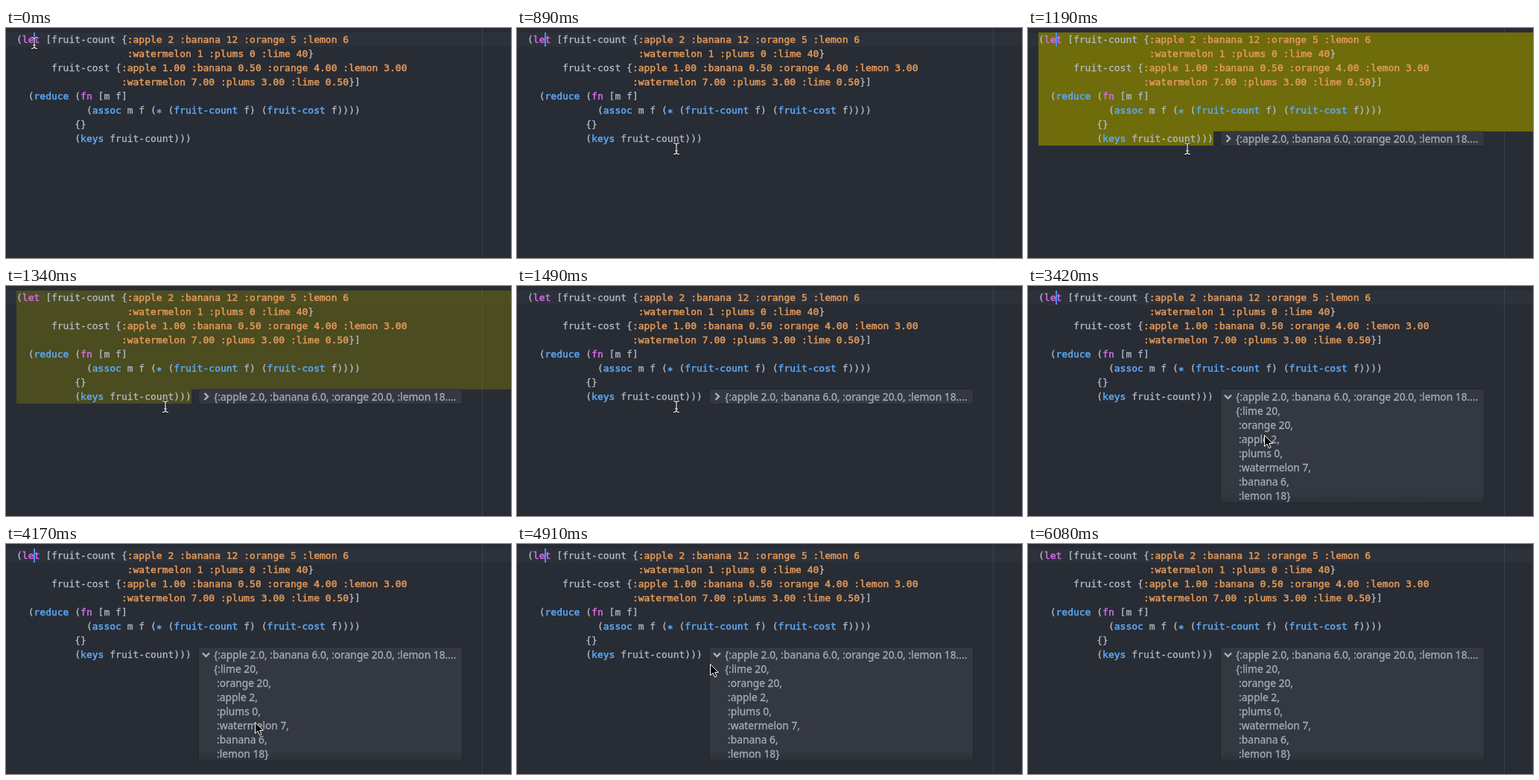
Recreate the animation shown at these times as an HTML page. Size 678 px wide and 309 px high, loop 6380 ms.

```html
<!DOCTYPE html>
<html lang="en">
<meta charset="utf-8">
<title>Inline evaluation</title>
<style>
  html, body { margin: 0; width: 100%; height: 100%; overflow: hidden; background: #282c34; }
  body > * { position: absolute; }
  pre { margin: 0; color: #b4bbc8; font: 13px/19px "DejaVu Sans Mono", monospace; }
  #code { left: 14px; top: 6px; -webkit-text-stroke: .3px; }
  #code span { -webkit-text-stroke: .5px; }
  .special { color: #d56cea; }
  .call { color: #5caaf8; }
  .star { position: relative; top: 3px; }
  .value { color: #e2995a; }
  #line { left: 0; top: 6px; width: 678px; height: 19px; background: #2c313a; }
  #guide { left: 639px; top: 0; width: 1px; height: 309px; background: #3b404a; }
  #flash { left: 14px; top: 6px; width: 664px; height: 152px; background: #6e6c0b;
    clip-path: polygon(0 0, 100% 0, 100% 133px, 235px 133px, 235px 100%, 0 100%); }
  #caret { left: 37px; top: 6px; width: 2px; height: 19px; background: #528bff; }
  #result { left: 259px; top: 139px; width: 353px; height: 19px; overflow: hidden;
    border-radius: 3px; background: #343841; box-shadow: 0 0 2px #1c1f25; }
  #result.open { height: 152px; background: linear-gradient(#343841 139px, #2c3038); }
  #result pre { margin-left: 20px; color: #a5acba; font: 13.8px/19px "Noto Sans", sans-serif;
    -webkit-text-stroke: .3px; }
  #result div { padding-left: 4px; }
  #result svg { position: absolute; left: 4px; top: 4px; }
  .open svg { transform: rotate(90deg); }
  #mouse { left: 0; top: 0; overflow: visible; }
</style>
<body>
<div id="line"></div>
<div id="guide"></div>
<div id="flash"></div>
<pre id="code">
(let [fruit-count {:apple 2 :banana 12 :orange 5 :lemon 6
                   :watermelon 1 :plums 0 :lime 40}
      fruit-cost {:apple 1.00 :banana 0.50 :orange 4.00 :lemon 3.00
                  :watermelon 7.00 :plums 3.00 :lime 0.50}]
  (reduce (fn [m f]
            (assoc m f (* (fruit-count f) (fruit-cost f))))
          {}
          (keys fruit-count)))</pre>
<div id="result">
  <svg width="11" height="11"><path d="M3.5 1L8 5.5L3.5 10" fill="none" stroke="#abb2bf" stroke-width="2.4"/></svg>
  <pre>{:apple 2.0, :banana 6.0, :orange 20.0, :lemon 18....
{:lime 20,<div>:orange 20,
:apple 2,
:plums 0,
:watermelon 7,
:banana 6,
:lemon 18}</div></pre>
</div>
<div id="caret"></div>
<svg id="mouse" width="1" height="1">
  <defs><path id="stem" d="M-4-7.5Q0-7.5 0-5V5Q0 7.5-4 7.5M4-7.5Q0-7.5 0-5M0 5Q0 7.5 4 7.5M-2 3H2"/></defs>
  <g id="beam" fill="none">
    <use href="#stem" stroke="#15171b" stroke-width="2.6"/>
    <use href="#stem" stroke="#f4f4f4" stroke-width="1.2"/>
  </g>
  <path id="arrow" d="M.5-.5V14.5L4.1 11.3L6.5 16.8L9 15.7L6.6 10.4H11.3Z" fill="#000" stroke="#fff"/>
</svg>
<script>
  const LOOP = 6380;
  const $ = id => document.getElementById(id);

  // The caret switches at each of these times, starting visible.
  const blinks = [440, 890, 1340, 1640, 2080, 2530, 2820, 3270, 3720, 4170, 4460, 4910, 5350, 5650, 6080];

  // time, x, y, pointer shape
  const moves = [
    [0, 38, 20, 'beam'], [150, 104, 76, 'beam'], [300, 186, 142, 'beam'], [440, 214, 162, 'beam'],
    [2230, 222, 160, 'beam'], [2380, 250, 153, 'beam'], [2530, 266, 148, 'arrow'],
    [2970, 270, 152, 'arrow'], [3120, 284, 168, 'arrow'], [3270, 304, 188, 'arrow'],
    [3420, 317, 201, 'arrow'], [3570, 330, 232, 'arrow'], [3720, 338, 248, 'arrow'],
    [4170, 334, 240, 'arrow'], [4320, 312, 214, 'arrow'], [4460, 284, 184, 'arrow'],
    [4610, 259, 162, 'arrow'], [5050, 268, 168, 'arrow'],
    [5200, 310, 190, 'arrow'], [5350, 390, 224, 'arrow'], [5500, 480, 258, 'arrow'],
    [5650, 560, 284, 'arrow'], [5790, 608, 300, 'beam'], [5940, 0, 0, 'none']
  ];

  const tokens = /(?<=\()[^\s()]+|:\w+|\b\d[\d.]*/g;
  const kind = word =>
    /^(let|fn)$/.test(word) ? 'special' :
    /^[:\d]/.test(word) ? 'value' :
    word === '*' ? 'call star' : 'call';
  $('code').innerHTML = $('code').textContent.replace(tokens, word => `<span class="${kind(word)}">${word}</span>`);

  const show = (id, on) => $(id).style.visibility = on ? 'visible' : 'hidden';

  function draw() {
    const t = performance.now() % LOOP;
    show('caret', blinks.filter(b => b <= t).length % 2 === 0);

    $('flash').style.opacity = t < 1190 || t >= 1490 ? 0 : t < 1340 ? 1 : .5;
    show('result', t >= 1190);
    $('result').classList.toggle('open', t >= 2820);

    const [, x, y, shape] = moves.findLast(m => m[0] <= t);
    $('mouse').style.transform = `translate(${x}px, ${y}px)`;
    show('beam', shape === 'beam');
    show('arrow', shape === 'arrow');
    requestAnimationFrame(draw);
  }
  draw();
</script>
</body>
</html>
```
